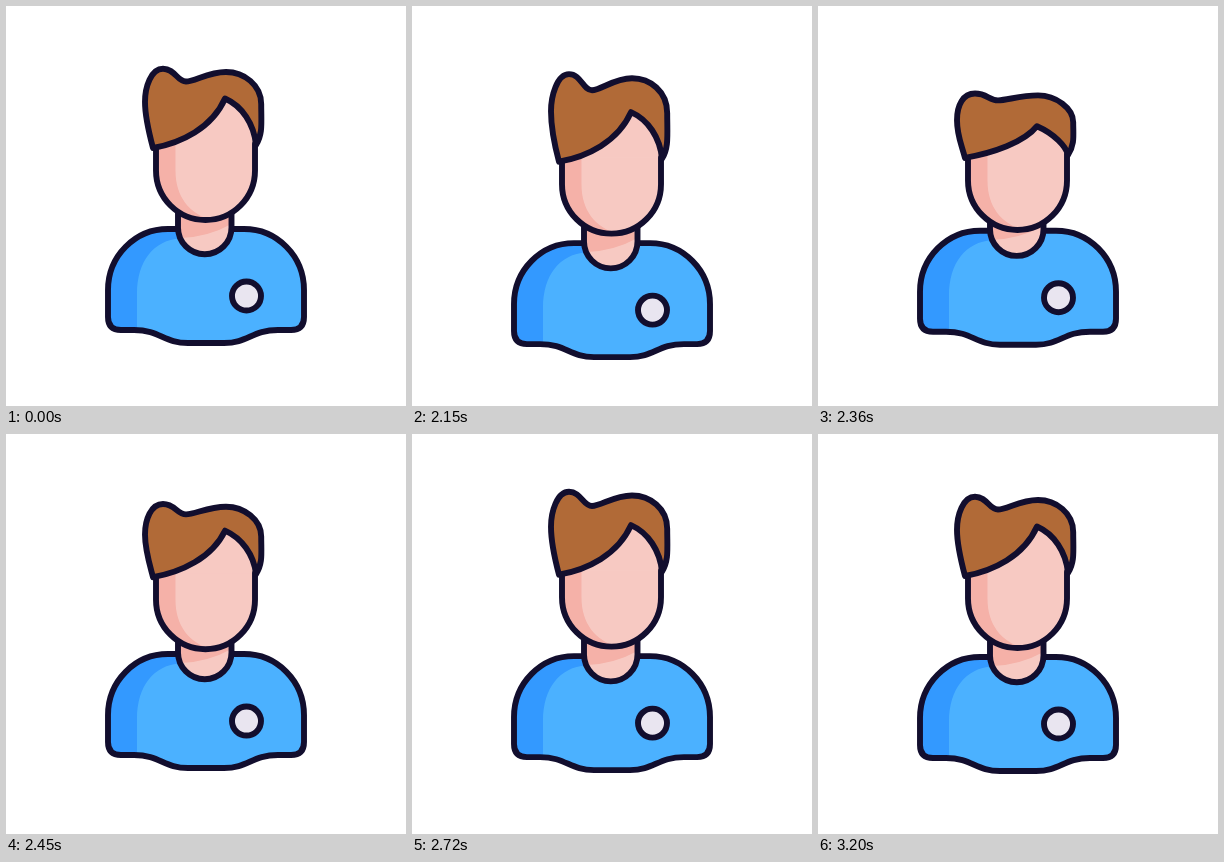
Write an HTML page that moves like this. It is 400 by 400 pixels and loops after 3.83 s.

```html
<!DOCTYPE html>
<html lang="en">
<head>
<meta charset="utf-8">
<title>Bobbing avatar</title>
<style>
  html, body { margin: 0; width: 100%; height: 100%; overflow: hidden; background: #fff; }
  svg { display: block; width: 100vw; height: 100vh; }
  .line { stroke: #120e2e; stroke-width: 5.9; stroke-linecap: round; stroke-linejoin: round; }
  .open { fill: none; }
  .shirt { fill: #4bb1ff; }
  .shirt-dark { fill: #3399ff; }
  .skin { fill: #f7c9c2; }
  .skin-dark { fill: #f5b1a8; }
  .hair { fill: #b16a37; }
  .badge { fill: #e9e5f0; }
</style>
</head>
<body>
<svg viewBox="0 0 400 400">
  <defs>
    <path id="shirt" d="M162 223H238C271 223 298 250 298 284V311Q298 324 285 324H272C246 324 242 337 218 337H182C158 337 154 324 128 324H115Q102 324 102 311V284C102 250 129 223 162 223Z"/>
    <path id="neck" d="M172 195V221.500A26.750 26.750 0 0 0 225.500 221.500V195"/>
    <path id="face" d="M150 138V164.500A49.500 49.500 0 0 0 249 164.500V138"/>
    <clipPath id="inShirt"><use href="#shirt"/></clipPath>
    <clipPath id="inFace"><use href="#face"/></clipPath>
  </defs>
  <g id="body">
    <use href="#shirt" class="shirt"/>
    <path class="shirt-dark" clip-path="url(#inShirt)" d="M100 220H174V232.500C148 234 131 255 131 288V340H100Z"/>
    <use href="#shirt" class="line open"/>
    <use href="#neck" class="skin"/>
    <path class="skin-dark" d="M172 195V221.500Q173 227 175 232Q202 231 225.500 218V195Z"/>
    <use href="#neck" class="line open"/>
    <circle class="badge line" cx="240.500" cy="290" r="14.500"/>
  </g>
  <g id="head">
    <path class="skin" d="M150 139Q162 100 219 94Q249 106 249 139Z"/>
    <use href="#face" class="skin"/>
    <path class="skin-dark" clip-path="url(#inFace)" d="M148 130H169.500V165C169.500 190 183 208 206 214H148Z"/>
    <use href="#face" class="line open"/>
    <path id="hair" class="hair line"/>
  </g>
</svg>
<script>
  const LOOP = 3830, START = 2030, STEP = 30;
  const $ = id => document.getElementById(id);

  // Turning points as [time, pixels down]; the head trails the body
  const bodyMove = [[2000, 0], [2170, 14.6], [2460, -3], [2870, 0]];
  const headMove = [[2010, 0], [2215, 17.7], [2590, -6.1], [2860, 4], [3200, 0]];
  const hairSquash = [[2030, 0], [2135, -8.5], [2350, 15], [2590, -9], [2860, 2.5], [3200, 0]];

  // Sine ease from one turning point to the next
  function swing(keys, t) {
    const next = keys.findIndex(k => k[0] > t);
    if (next < 1) return 0;
    const [t0, y0] = keys[next - 1], [t1, y1] = keys[next];
    return y0 + (y1 - y0) * (1 - Math.cos(Math.PI * (t - t0) / (t1 - t0))) / 2;
  }

  // The crown moves most, the sides and the dip follow, the tips stay put
  function hairPath(squash) {
    const crown = 62.7 + squash;
    const dip = 75.5 + squash * .6;
    const back = 66 + squash * .9;
    const side = 96 + squash * .55;
    const part = 92.5 + Math.max(0, squash) ** 2 * .08;
    return `M147 142C143 127 139 ${side + 15} 139 ${side}
      S145 ${crown} 157 ${crown}
      S171 ${dip} 180 ${dip}
      S202 ${back} 220 ${back}
      S255.2 ${back + 13} 255.2 ${side + 2}
      S257 128 250 139
      C248 ${part * .7 + 53} 236 ${part + 7.5} 219 ${part}
      C206 ${part * .25 + 99} 175 137 147 142Z`;
  }

  const shift = (id, y) => $(id).setAttribute("transform", `translate(0 ${y})`);

  function draw(ms) {
    const late = ms % LOOP - START;
    const t = late < 0 ? 0 : START + Math.floor(late / STEP) * STEP;
    shift("body", swing(bodyMove, t));
    shift("head", swing(headMove, t));
    $("hair").setAttribute("d", hairPath(swing(hairSquash, t)));
  }

  const begin = performance.now();
  function tick() {
    draw(performance.now() - begin);
    requestAnimationFrame(tick);
  }
  tick();
</script>
</body>
</html>
```
